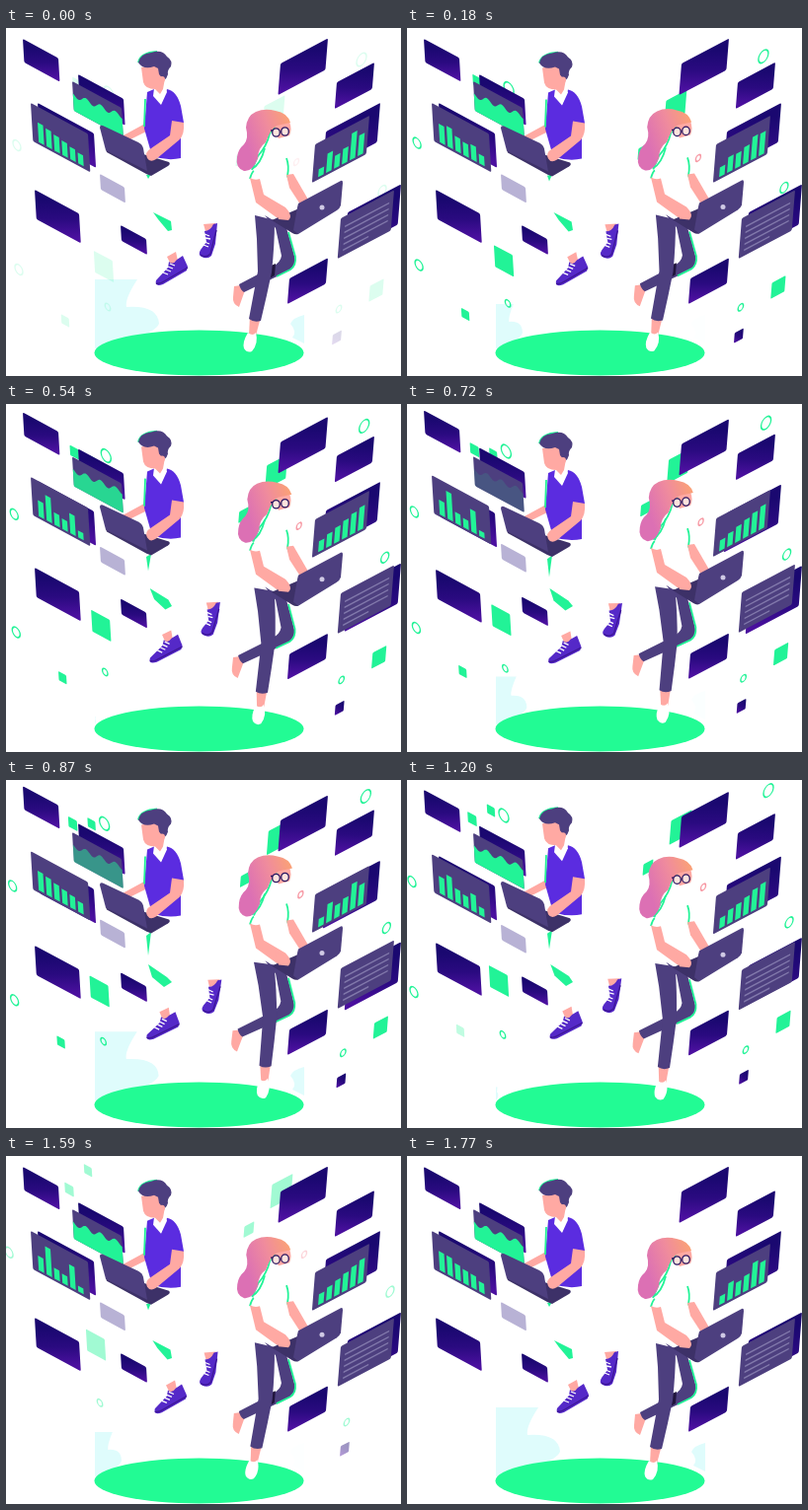
An HTML page for the animation above (1.8 s loop, 400 by 353 pixels).

```html
<!DOCTYPE html>
<html lang="en">
<head>
<meta charset="utf-8">
<title>Floating work</title>
<style>
html, body { margin: 0; height: 100%; overflow: hidden; background: #fff; }
svg { display: block; width: 100vw; height: 100vh; }
.slate { fill: #4d3f7f; }
.dark { fill: #3d3168; }
.skin { fill: #ffa9a3; }
.shoe { fill: #5529c8; }
.green { fill: #22f397; }
.mist { fill: #dffcfc; }
.lace, .edge, .ring, .text { fill: none; }
.lace { stroke: #fff; stroke-width: 1.3; }
.sole { fill: none; stroke: #3d1699; stroke-width: 1.4; }
.edge { stroke: #22f397; stroke-width: 1.8; }
.ring { stroke: #22f397; stroke-width: 1.4; }
.text { stroke: #8178ab; stroke-width: 1.6; }
</style>
</head>
<body>
<svg viewBox="0 0 400 353">
  <defs>
    <linearGradient id="navy">
      <stop offset=".2" stop-color="#1a0870"/>
      <stop offset=".55" stop-color="#2a0a80"/>
      <stop offset=".9" stop-color="#4b109f"/>
    </linearGradient>
    <linearGradient id="navyL" href="#navy" x1="0" x2=".88" y2="1.1"/>
    <linearGradient id="navyR" href="#navy" x1="1" x2=".12" y2="1.1"/>
    <linearGradient id="hair" y1=".4" y2="0">
      <stop offset=".1" stop-color="#dc70b4"/>
      <stop offset=".55" stop-color="#f08c9c"/>
      <stop offset="1" stop-color="#fca56f"/>
    </linearGradient>
  </defs>

  <path id="mist" class="mist" d="M0 0V-70H43Q30 -50 32 -42Q64 -44 65 -25Q60 -12 0 0Z"/>
  <path id="mistR" class="mist" d="M302 291Q290 294 288 300Q295 308 290 314L302 320Z"/>
  <ellipse cx="195.5" cy="329.5" rx="106" ry="23" fill="#22fb94"/>
  <g id="floaters"></g>
  <g id="panels"></g>
  <path id="sliver" class="green"/>
  <path id="hem" class="green"/>

  <g id="man">
    <path class="skin" d="M141 84L139 98 117 110 122 115 144 104Z"/>
    <path fill="#5b2ce0" d="M143 65L150 62 157 77 163 62Q173 64 177 79L180 96 177 104 177 132Q164 135 148 130L140 102Z"/>
    <path class="edge" d="M141 72L140 100M134 35Q136 25 153 24"/>
    <path fill="#fff" d="M150 61L162 61 163 65 157 78 149 69Z"/>
    <path class="skin" d="M137 40L158 36 161 51 159 62 156 67 151 62Q141 62 139 55Z"/>
    <path class="slate" d="M134 35Q136 26 147 25Q158 21 163 29Q169 33 167 39Q163 43 164 47Q163 51 160 53L155 47 154 41 150 39Q139 43 134 35Z"/>
    <circle class="skin" cx="158" cy="52" r="3"/>
    <path class="dark" d="M139 128L165 136Q167 138 164 140L147 150 142 148 102 126 101 123Z"/>
    <path class="slate" d="M95 101Q95 98 98 99L134 116Q138 118 139 122L143 145 101 124Z"/>
    <path class="skin" d="M168 94L180 96Q181 107 176 113L152 133Q146 137 143 132Q140 126 147 122L166 109Z"/>
  </g>

  <g id="shoeL">
    <path class="skin" d="M163 232L172 227 174 236 167 240Z"/>
    <path class="shoe" d="M152 256L164 243 165 237Q169 241 173 235L179 231 184 242 183 246 159 260Q150 263 152 256Z"/>
    <path class="sole" d="M152 259Q156 260 160 257L184 243"/>
    <path class="lace" d="M159 248l5 2M162 245l5 2M164 242l5 2M166 239l5 2"/>
  </g>
  <g id="shoeR">
    <path class="skin" d="M200 199L212 198 212 205 202 206Z"/>
    <path class="shoe" d="M201 206Q207 206 210 199L214 198 212 219 208 231Q204 235 198 232Q194 230 197 225L203 217Z"/>
    <path class="sole" d="M197 230Q202 234 207 229L213 205"/>
    <path class="lace" d="M201 209l5 2M202 213l5 1M201 217l5 2M200 220l5 2"/>
  </g>

  <g id="woman">
    <g id="legBack">
      <path class="skin" d="M231 262L238 261 242 266 236 283Q229 280 230 273Z"/>
      <path class="slate" d="M262 190L284 203Q289 218 293 235Q294 242 287 246L241 268Q237 265 236 260L270 242Q278 238 279 231L273 203Z"/>
      <path fill="#21153d" d="M266 242L273 239 272 251 267 254Z"/>
      <path class="edge" d="M286 207L293 232Q294 241 288 245L274 252"/>
    </g>
    <g id="legFront">
      <path class="skin" d="M247 292L258 293 253 312 246 312Z"/>
      <path fill="#fff" d="M245 309Q250 313 253 309Q256 320 249 328Q244 330 241 325Q239 319 245 309Z"/>
      <path class="slate" d="M252 190L272 195Q272 220 269 248Q264 272 258 297Q251 299 246 295L255 247 254 214Z"/>
    </g>
    <path class="edge" d="M247 153Q249 146 251 145M284 132Q287 140 285 150L289 160M249 143Q258 138 262 122"/>
    <path class="skin" d="M284 149L291 148 306 174 298 179 287 162Z"/>
    <path class="skin" d="M247 152Q252 155 257 153L261 169 283 182Q290 189 287 195L275 193 253 177Z"/>
    <path class="dark" d="M269 195L297 183 296 209Q293 210 290 208Z"/>
    <path class="slate" d="M296 178L339 155Q341 154 341 157L339 180Q338 183 335 185L296 209 291 205 295 182Z"/>
    <path class="skin" d="M272 181L286 186Q290 191 286 195L276 194Z"/>
    <circle cx="320" cy="182" r="2.5" fill="#cfc9e4"/>
    <path class="skin" d="M268 99L287 95Q290 103 287 109L276 112Z"/>
    <g id="hairdo">
      <path class="edge" d="M272 100L267 107Q264 120 255 130L249 144"/>
      <path fill="url(#hair)" d="M253 85Q262 81 273 84Q285 86 288 96L274 99Q267 104 263 116Q255 122 255 132Q250 146 241 145Q232 142 234 131Q235 123 241 118Q246 112 243 101Q244 89 253 85Z"/>
    </g>
    <g fill="#ffe3dd" stroke="#28145f" stroke-width="1.3">
      <ellipse cx="273.5" cy="106" rx="3.8" ry="4.2"/>
      <ellipse cx="282.5" cy="105" rx="3.8" ry="4.2"/>
      <path d="M268 104L270 104"/>
    </g>
  </g>
</svg>
<script>
const LOOP = 1800, STEP = 30, TAU = 2 * Math.PI;
const $ = id => document.getElementById(id);
const set = (id, name, value) => $(id).setAttribute(name, value);
const clamp = v => Math.max(0, Math.min(1, v));
const range = n => [...Array(n).keys()];

function add(parent, tag, attrs) {
  const node = document.createElementNS("http://www.w3.org/2000/svg", tag);
  for (const name in attrs) node.setAttribute(name, attrs[name]);
  return parent.appendChild(node);
}

// Both halves of the stage lean towards the middle
const isLeft = x => x < 200;
const lean = (x, y) => `matrix(${isLeft(x) ? "1 .54 .06" : "1 -.53 -.08"} 1 ${x} ${y})`;
const navy = x => `url(#navy${isLeft(x) ? "L" : "R"})`;

// Panels: top left corner, size, and how far the pulse pushes them down
const panels = [];
function panel(x, y, width, height, push, fill = navy(x)) {
  const node = add($("panels"), "g");
  add(node, "rect", { width, height, fill, rx: 1.5 });
  panels.push({ node, x, y, push });
  return node;
}
const SLATE = "#4d3f7f";
panel(17, 11, 36, 24, -5);
panel(278, 36, 48, 32, 5);
panel(335, 55, 38, 27, -5);
panel(73, 47, 46, 27, -3);
const wavePanel = panel(67, 54, 50, 30, -1, SLATE);
panel(32, 76, 57, 35, 4);
const leftChart = panel(25, 76, 58, 39, -4, SLATE);
panel(29, 164, 45, 30, 4);
panel(116, 200, 26, 16, -5);
panel(95, 148, 25, 16, -7, "#b8b2d5");
panel(324, 105, 55, 40, 6);
const rightChart = panel(313, 118, 55, 39, -2, SLATE);
panel(346, 187, 54, 41, 6);
const textPanel = panel(339, 193, 54, 41, -2, SLATE);
panel(287, 254, 39, 26, -1);

const waveY = x => 14 - .11 * x + 2.5 * Math.sin(.42 * x - .75);
const wave = add(wavePanel, "path", {
  class: "green", d: `M0 30${range(51).map(x => `L${x} ${waveY(x)}`).join("")}V30Z`,
});
add(textPanel, "path", {
  class: "text", d: range(5).map(i => `M5 ${11 + i * 6}h${i < 4 ? 45 : 26}`).join(""),
});
const leftBars = add(leftChart, "path", { class: "green" });
const rightBars = add(rightChart, "path", { class: "green" });
const bars = height => range(6).map(i => `M${6 + i * 8} 36.5v${-height(i)}h5.5V36.5Z`).join("");
const ripple = i => Math.cos(TAU * (i - 1) / 3);

// Floaters: starting centre, rise per loop, size, end of life
const floaters = [];
function floater(tag, attrs, x, y, rise, end = 1650) {
  floaters.push({ node: add($("floaters"), tag, attrs), x, y, rise, end });
}
const ring = (x, y, rise, r, end) =>
  floater("ellipse", { class: "ring", rx: r, ry: r * 1.25 }, x, y, rise, end);
const tile = (x, y, rise, w, end, fill = "#22f397") =>
  floater("rect", { x: -w / 2, y: -w * .58, width: w, height: w * 1.16, rx: 1, fill }, x, y, rise, end);

ring(360, 32, 32, 5, 1400);
ring(381, 165, 31, 4);
ring(11, 119, 24, 4);
ring(13, 245, 45, 4, 1400);
ring(103, 283, 37, 2.7);
ring(337, 285, 17, 2.7);
ring(294, 136, 41, 2.5);
floaters.at(-1).node.style.stroke = "#f79aa5";
ring(104, 66, 45, 5, 1400);
tile(99, 242, 57, 19);
tile(60, 297, 64, 8, 1240);
tile(375, 266, 31, 14, 1470);
tile(335, 314, 19, 9, 1650, navy(335));
tile(72, 57, 26, 9);
tile(91, 81, 75, 8);
tile(271, 86, 57, 21);
tile(238, 132, 65, 10);

function draw(t) {
  const k = t / LOOP;
  const swing = p => (1 - Math.cos(TAU * p)) / 2;
  const bob = swing(k), pulse = swing(k + .05) ** 3;
  const surge = t / 850 % 1;

  set("man", "transform", `translate(0 ${5.5 * bob})`);
  set("shoeL", "transform", `translate(${-8.5 * bob} ${3.5 * bob}) rotate(${4 * bob} 168 245)`);
  set("shoeR", "transform", `translate(${3.5 * bob} ${4 * bob}) rotate(${3 * bob} 206 215)`);
  set("woman", "transform", `translate(0 ${-6.5 * bob})`);
  set("hairdo", "transform", `translate(${2 * bob} 0)`);
  set("legFront", "transform", `rotate(${-6.3 * bob} 262 200)`);
  set("legBack", "transform", `rotate(${1.5 * bob} 276 205)`);
  set("sliver", "d", `M${149 - 5 * bob} 187L${167 - 4 * bob} ${196 + 4 * bob} 168 205L${164 - 4 * bob} ${206 + 4 * bob} ${154 - 6 * bob} ${194 + 6 * bob}Z`);
  set("hem", "d", `M142 ${149 + 9 * bob}L147 ${148 + 6 * bob} 144 ${153 + 25 * bob}Z`);

  for (const { node, x, y, push } of panels)
    node.setAttribute("transform", lean(x, y + push * pulse));
  for (const { node, x, y, rise, end } of floaters) {
    const drift = (isLeft(x) ? -9 : 9) * k;
    node.setAttribute("transform", lean(x + drift, y - rise * k));
    node.setAttribute("opacity", clamp((t + 25) / 160) * clamp((end - t) / 140));
  }

  leftBars.setAttribute("d", bars(i => 20 - 1.8 * i + 12 * surge * ripple(i)));
  rightBars.setAttribute("d", bars(i => 11 + 2.6 * i + 6 * (1 - surge) ** 4 * ripple(i)));
  wave.setAttribute("opacity", clamp(Math.abs(t - 750) / 250));

  const tide = Math.cos(Math.PI * t / 885) ** 2;
  set("mist", "transform", `translate(90 325) scale(${tide ** 2} ${tide})`);
  set("mistR", "opacity", tide ** 6);
}

const began = performance.now();
function tick() {
  const t = (performance.now() - began) % LOOP;
  draw(Math.floor(t / STEP) * STEP);
  requestAnimationFrame(tick);
}
tick();
</script>
</body>
</html>
```
